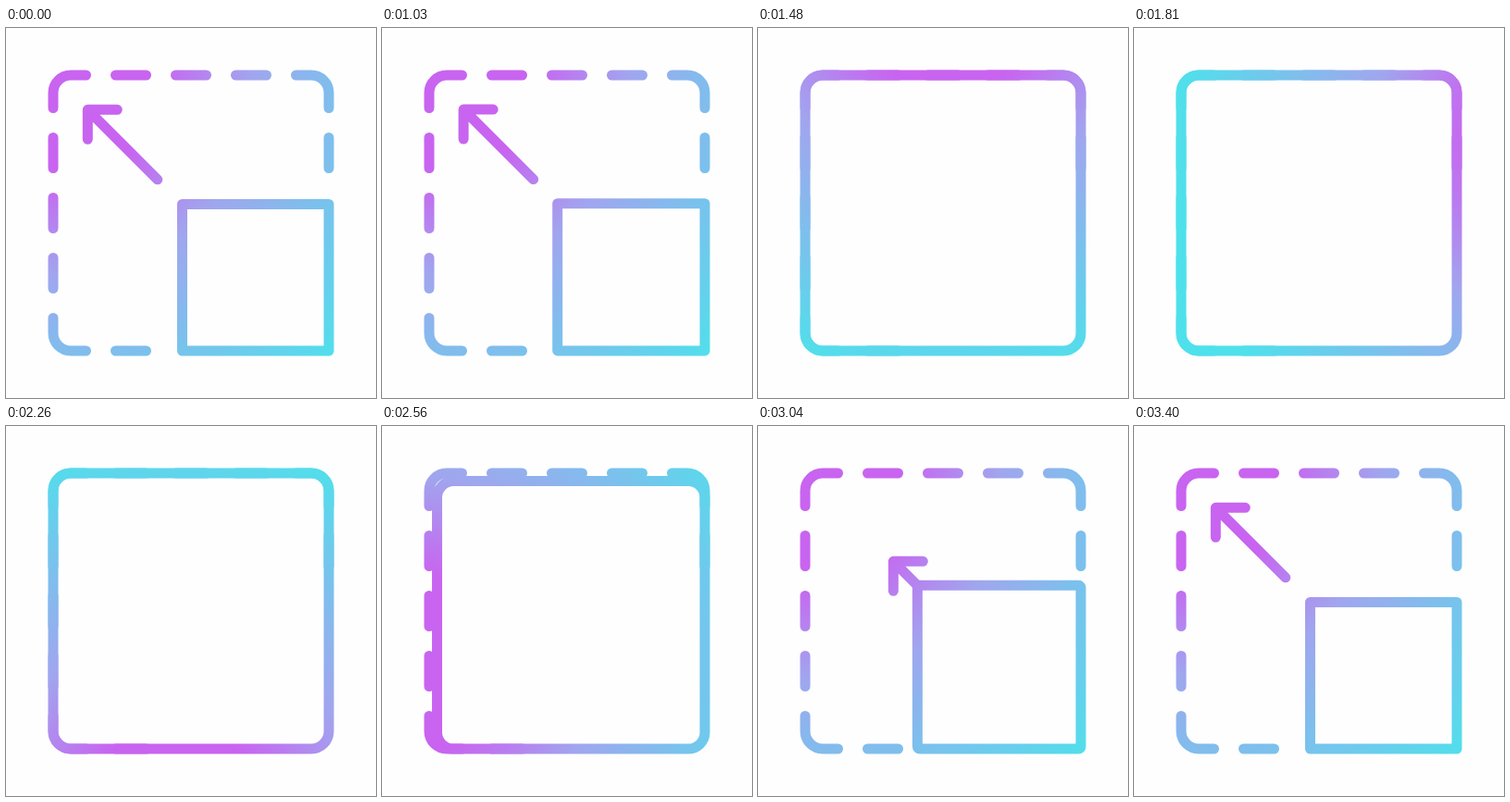
Animation of 400 by 400 pixels, one loop 3.43 s. Source, as an HTML page with a canvas:

```html
<!DOCTYPE html>
<html lang="en">
<head>
<meta charset="utf-8">
<title>Resize icon</title>
<style>
  html, body { margin: 0; width: 100%; height: 100%; overflow: hidden; background: #fefefe; }
  canvas { display: block; width: 400px; height: 400px; }
</style>
</head>
<body>
<canvas id="stage" width="400" height="400"></canvas>
<script>
const ctx = document.getElementById('stage').getContext('2d');
const LOOP = 3430, PAPER = '#fefefe';
const NEAR = 51, FAR = 349, REST = 190.5, RADIUS = 19;
const DASH = 33, PITCH = 65, FIRST = 118.5;

const mix = (a, b, k) => a + (b - a) * k;
const ease = (t, from, to) => {
  const x = Math.min(1, Math.max(0, (t - from) / (to - from)));
  return x * x * (3 - 2 * x);
};

// The colour centre circles the icon once, clockwise from the top left.
function gradient(t) {
  const angle = Math.PI * (1.25 + 2 * ease(t, 1000, 3130));
  const reach = 230 + 50 * Math.cos(angle);
  const x = 200 + reach * Math.cos(angle), y = 200 + reach * Math.sin(angle);
  const paint = ctx.createRadialGradient(x, y, 100, x, y, 420);
  paint.addColorStop(0, '#c864f0');
  paint.addColorStop(0.33, '#a0a6ee');
  paint.addColorStop(1, '#4ee1eb');
  return paint;
}

function line(...points) {
  ctx.moveTo(...points[0]);
  points.slice(1).forEach(p => ctx.lineTo(...p));
}

function corner(x0, y0, cx, cy, x1, y1) {
  ctx.moveTo(x0, y0);
  ctx.arcTo(cx, cy, x1, y1, RADIUS);
  ctx.lineTo(x1, y1);
}

function dashes() {
  const a = FIRST - PITCH + DASH, b = FIRST + 3 * PITCH;
  ctx.beginPath();
  corner(NEAR, a, NEAR, NEAR, a, NEAR);
  corner(b, NEAR, FAR, NEAR, FAR, a);
  corner(NEAR, b, NEAR, FAR, a, FAR);
  for (let i = 0; i < 3; i++) {
    const s = FIRST + i * PITCH, e = s + DASH;
    line([s, NEAR], [e, NEAR]);
    line([NEAR, s], [NEAR, e]);
  }
  line([FIRST, FAR], [FIRST + DASH, FAR]);
  line([FAR, FIRST], [FAR, FIRST + DASH]);
  ctx.stroke();
}

function arrow(tip) {
  ctx.beginPath();
  line([tip, tip + 32], [tip, tip], [tip + 32, tip]);
  line([tip, tip], [tip + 75.5, tip + 75.5]);
  ctx.stroke();
}

// Opaque, so the arrow slips behind it.
function square(grown) {
  const start = mix(REST, NEAR, grown);
  ctx.beginPath();
  ctx.roundRect(start, start, FAR - start, FAR - start, RADIUS * grown);
  ctx.fill();
  ctx.stroke();
}

function draw(t) {
  ctx.fillStyle = PAPER;
  ctx.fillRect(0, 0, 400, 400);
  ctx.strokeStyle = gradient(t);
  ctx.lineWidth = 11;
  ctx.lineCap = ctx.lineJoin = 'round';

  const grown = ease(t, 1010, 1485) - ease(t, 2445, 3215);
  const tip = t < 2200
    ? mix(88.3, 66, ease(t, 1005, 1485))
    : mix(REST, 88.3, ease(t, 2750, 3390));
  arrow(tip);
  square(grown);
  dashes();
}

const began = performance.now();
function tick() {
  draw((performance.now() - began) % LOOP);
  requestAnimationFrame(tick);
}
tick();
</script>
</body>
</html>
```
